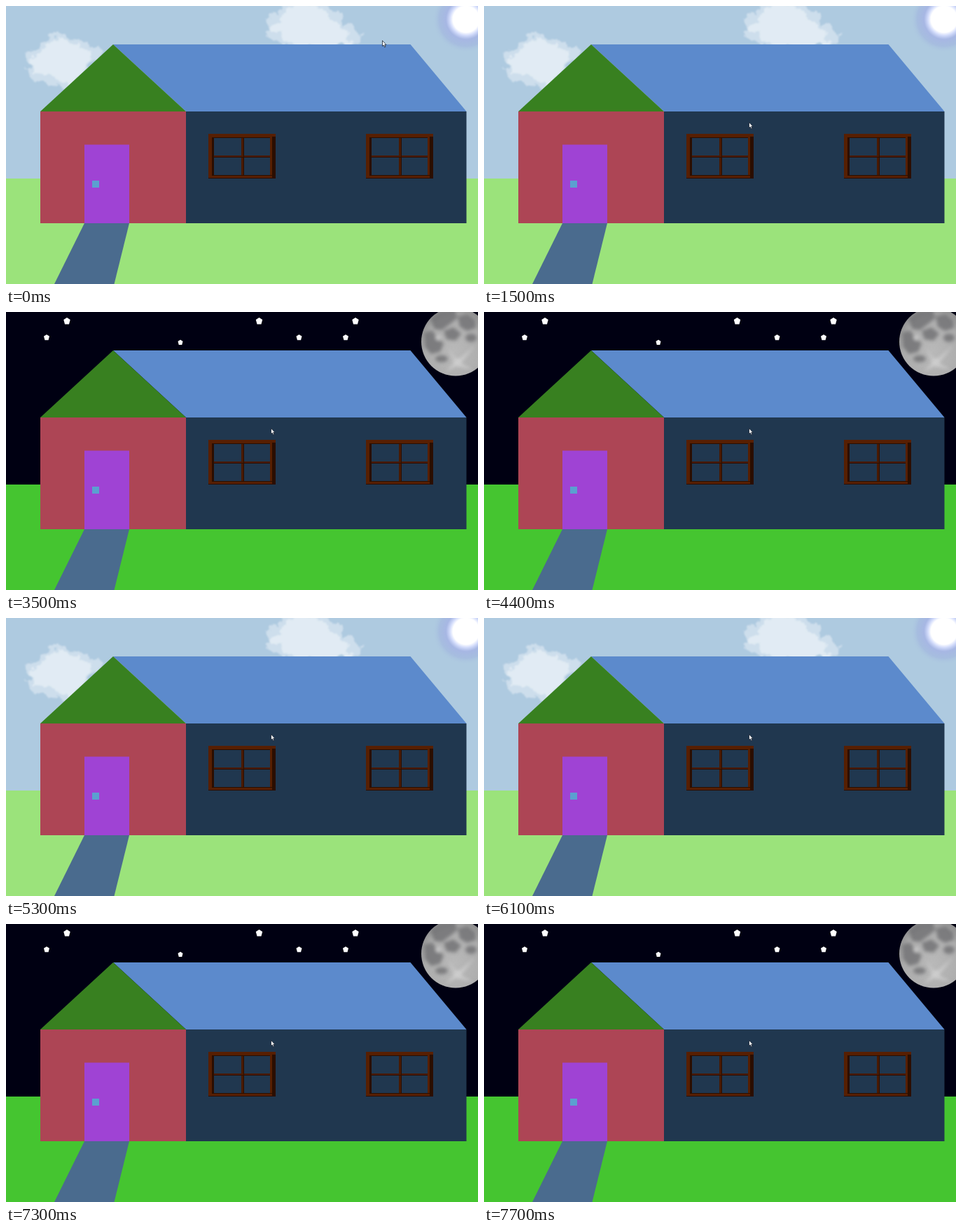
An HTML page that plays this animation: 674x398 px, repeating every 8000 ms.

```html
<!DOCTYPE html>
<html lang="en">
<head>
<meta charset="utf-8">
<title>House by day and night</title>
<style>
  html, body { margin: 0; width: 100%; height: 100%; overflow: hidden; background: #aecae0; }
  svg { display: block; width: 674px; height: 398px; }
  #night { opacity: 0; }
</style>
</head>
<body>
<svg viewBox="0 0 674 398">
  <defs>
    <filter id="wisp" x="-20%" y="-20%" width="140%" height="140%">
      <feTurbulence type="fractalNoise" baseFrequency=".07" numOctaves="4" seed="8" result="n"/>
      <feDisplacementMap in="SourceGraphic" in2="n" scale="20" xChannelSelector="R" yChannelSelector="G"/>
      <feGaussianBlur stdDeviation="1.2"/>
    </filter>
    <filter id="soft"><feGaussianBlur stdDeviation="2.5"/></filter>
    <radialGradient id="glow">
      <stop offset="0" stop-color="#fff"/>
      <stop offset=".39" stop-color="#fff"/>
      <stop offset=".48" stop-color="#d3dcfb"/>
      <stop offset=".6" stop-color="#a6b5e4" stop-opacity=".9"/>
      <stop offset=".8" stop-color="#a2b6df" stop-opacity=".65"/>
      <stop offset="1" stop-color="#aecae0" stop-opacity="0"/>
    </radialGradient>
    <radialGradient id="lunar" cx=".55" cy=".6" r=".6">
      <stop offset="0" stop-color="#b9b9b9"/>
      <stop offset=".75" stop-color="#adadad"/>
      <stop offset="1" stop-color="#8d8d8d"/>
    </radialGradient>
    <clipPath id="disc"><circle cx="642" cy="42.500" r="49"/></clipPath>
    <path id="star" d="M0-5 4.700-2 3 4.500H-3L-4.700-2Z" fill="#fff"/>
    <g id="window">
      <path fill="#571f02" d="M0 0h96v64H0z"/>
      <path fill="#2b0e00" d="M5 5h3v54H5zM91 4h5v60h-5zM5 59h86v1H5zM0 63h96v1H0z"/>
      <path fill="#20374f" d="M8 6h80v53H8z"/>
      <path fill="#491a02" d="M47 5h4v54h-4zM8 31h80v3H8z"/>
      <path fill="#2b0e00" d="M50 5h1v54h-1zM8 33h80v1H8zM8 5h80v1H8z"/>
    </g>
  </defs>

  <g id="day">
    <path fill="#aecae0" d="M0 0h674v247H0z"/>
    <path fill="#9be37b" d="M0 247h674v151H0z"/>
    <g filter="url(#wisp)" fill="#e7eff6">
      <path opacity=".55" d="M26 68 40 65 51 50 66 43 84 41 104 50 122 55 136 66 120 84 98 120 76 117 57 108 39 107 28 92 36 82Z"/>
      <path opacity=".8" d="M34 77 48 69 58 54 76 46 94 52 108 60 127 63 116 82 98 113 76 110 58 99 40 94Z"/>
      <path opacity=".55" d="M370 18 386 12 393-6 452-6 474 10 484 24 496 33 510 42 492 58 406 58 386 49 370 41 380 31Z"/>
      <path opacity=".8" d="M377 30 391 20 401 2 420-6 445 0 463 13 478 27 491 43 489 58 419 58 394 46Z"/>
    </g>
    <circle cx="657" cy="19" r="48" fill="url(#glow)"/>
  </g>

  <g id="night">
    <path fill="#000012" d="M0 0h674v247H0z"/>
    <path fill="#45c530" d="M0 247h674v151H0z"/>
    <g id="stars"></g>
    <g clip-path="url(#disc)">
      <path fill="url(#lunar)" d="M590-10h90v110h-90z"/>
      <g filter="url(#soft)" fill="#6f7072" opacity=".8">
        <path d="M606 9 620-2 640-4 645 8 633 18 622 26 611 24Z"/>
        <path d="M597 30 608 26 616 37 625 45 620 57 607 60 598 50Z"/>
        <path d="M645 6 659 3 670 12 671 23 658 27 648 21Z"/>
        <path d="M625 27 639 22 650 31 642 41 629 39Z"/>
        <ellipse cx="664" cy="37" rx="8" ry="6"/>
        <ellipse cx="622" cy="67" rx="9" ry="5"/>
      </g>
      <g filter="url(#soft)" fill="#d5d5d5" opacity=".75">
        <circle cx="645" cy="72" r="6"/>
        <circle cx="617" cy="37" r="4"/>
        <path d="M644 70 670 48 649 73 667 83 643 77 627 86 641 72 631 51Z"/>
      </g>
    </g>
  </g>

  <path fill="#4a6b8e" d="M112 311h64L154.500 398H69Z"/>
  <path fill="#5c8acc" d="M153 55h424.500L657.500 151H257Z"/>
  <path fill="#388020" d="M153 55 257 151H49Z"/>
  <path fill="#ad4555" d="M49 151h208v160H49z"/>
  <path fill="#20374f" d="M257 151h400.500v160H257z"/>
  <path fill="#9f43d4" d="M112 198.500h64V311h-64z"/>
  <path fill="#5ba0d0" d="M123 250h10v10h-10z"/>
  <use href="#window" x="289" y="183"/>
  <use href="#window" x="514" y="183"/>

  <g id="cursor">
    <path d="M.5.500V8.500L2.300 7 3.700 10 5 9.400 3.700 6.500H6Z" fill="#fff" stroke="#1a2433" stroke-width=".8"/>
  </g>
</svg>
<script>
  const LOOP = 8000;
  const $ = id => document.getElementById(id);

  // x, y, scale
  const stars = [[87, 13, 1], [58, 36.500, .85], [249, 43.500, .75], [361.500, 13, 1],
    [418.500, 36.500, .85], [485, 36.500, .85], [499, 13, 1]];
  $('stars').innerHTML = stars.map(([x, y, s]) =>
    `<use href="#star" transform="translate(${x} ${y}) scale(${s})"/>`).join('');

  // Holds each value until the next time in the table
  function hold(id, prop, steps) {
    const frames = steps.map(([t, v]) => ({ offset: t / LOOP, [prop]: v, easing: 'step-end' }));
    frames.push({ ...frames[frames.length - 1], offset: 1 });
    $(id).animate(frames, { duration: LOOP, iterations: Infinity });
  }

  hold('night', 'opacity', [[0, 0], [3500, 1], [5300, 0], [7300, 1]]);

  const from = [537, 49], to = [378, 166];
  const smooth = u => u * u * (3 - 2 * u);
  const moves = [];
  for (let i = 0; i <= 5; i++) {
    const [x, y] = from.map((a, k) => Math.round(a + (to[k] - a) * smooth(i / 5)));
    moves.push([i * 100, `translate(${x}px, ${y}px)`]);
  }
  hold('cursor', 'transform', moves);
</script>
</body>
</html>
```
